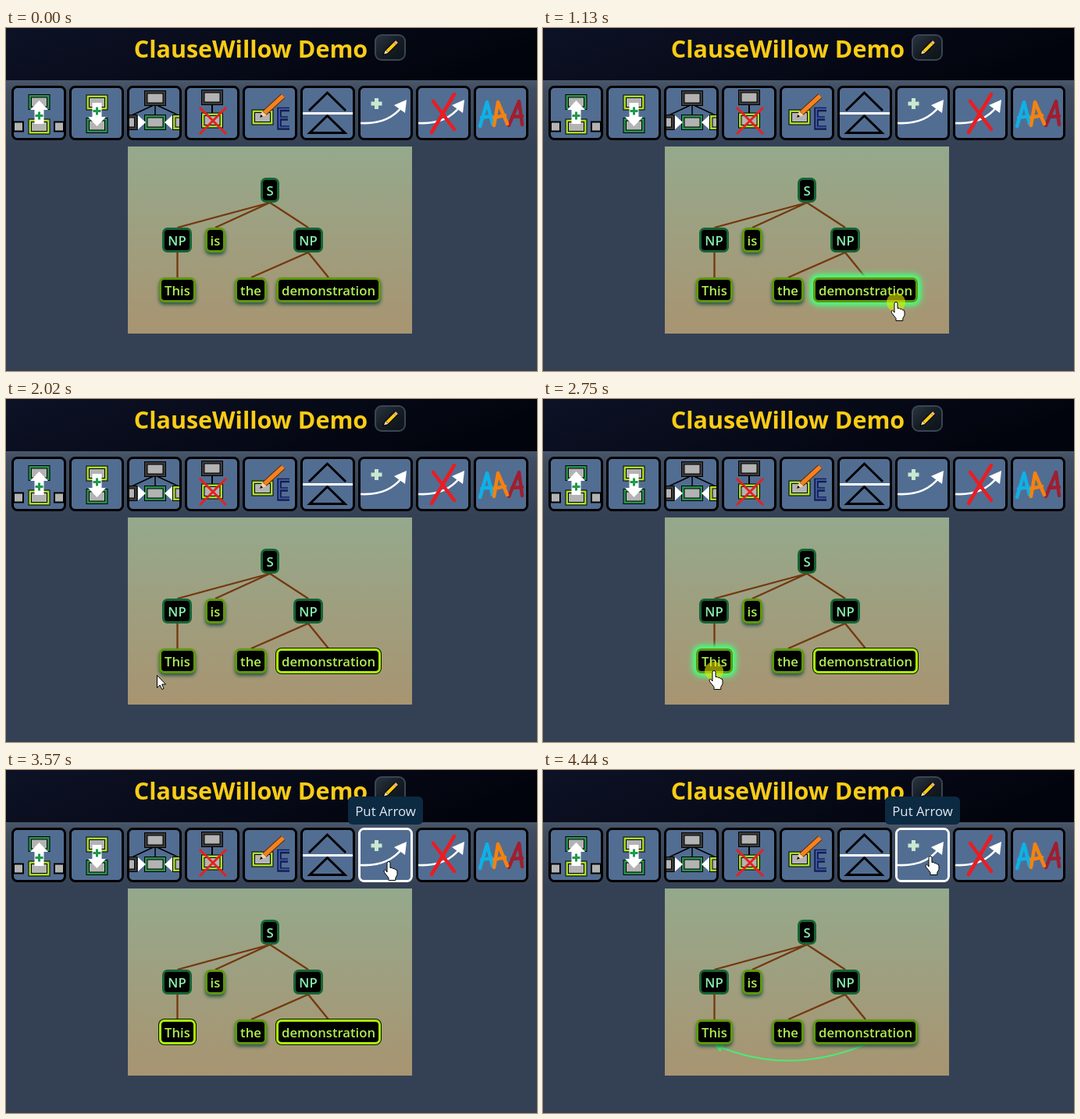
Recreate the animation shown at these times as an HTML page. Size 680x440 px, loop 6.57 s.

```html
<!DOCTYPE html>
<html lang="en">
<head>
<meta charset="utf-8">
<title>Syntax tree demo</title>
<style>
html, body { margin: 0; width: 100%; height: 100%; overflow: hidden; background: #334155; }
body { position: relative; font-family: "Open Sans", "Noto Sans", sans-serif; }
svg, #tree { position: absolute; left: 0; top: 0; width: 680px; height: 440px; }
text { font-family: "Open Sans", "Noto Sans", sans-serif; }
.node {
  position: absolute; box-sizing: border-box; height: 32px; padding-top: 2px;
  display: flex; align-items: center; justify-content: center;
  border: 3px solid #166534; border-radius: 7px;
  background: #000; color: #86efac;
  font-size: 16.7px; font-weight: 600; line-height: 1; white-space: nowrap;
}
.leaf { border-color: #5f980d; color: #b0ee50; box-shadow: 0 3px 4px rgba(25, 75, 65, .85); }
.picked { border-color: #aaf20a; box-shadow: 0 0 0 1px #0a1400; }
.glow { box-shadow: 0 0 4px 3px #50f47c, 0 0 9px 4px #50f47c; }
</style>
</head>
<body>
<svg viewBox="0 0 680 440">
  <defs>
    <linearGradient id="head" x2="1" y2=".25">
      <stop stop-color="#0d1226"/><stop offset="1" stop-color="#02040d"/>
    </linearGradient>
    <linearGradient id="bar" x2="0" y2="1">
      <stop stop-color="#4a586b"/><stop offset=".15" stop-color="#404d61"/><stop offset="1" stop-color="#354256"/>
    </linearGradient>
    <linearGradient id="board" x2="0" y2="1">
      <stop stop-color="#95a98c"/><stop offset="1" stop-color="#a89471"/>
    </linearGradient>
    <linearGradient id="edit" x2="1" y2="1">
      <stop stop-color="#2c3541"/><stop offset=".5" stop-color="#161d24"/><stop offset="1" stop-color="#0c1316"/>
    </linearGradient>
    <clipPath id="clip3"><rect x="158" y="77" width="64" height="64"/></clipPath>
    <rect id="btn" x="8.5" y="75.5" width="67" height="67" rx="6" fill="#526d92" stroke="#000" stroke-width="3"/>
    <g id="box">
      <path d="M-14-10h28v20h-28z"/>
      <path d="M-13-9h26v18h-26z" fill="currentColor"/>
      <path d="M-10.500-6.500h21v13h-21z"/>
      <path d="M-9.500-5.500h19v11h-19z" fill="#b3b3b3"/>
    </g>
    <path id="up" d="M0-15L11.500-3H6V15H-6V-3H-11.500Z" fill="#fff"/>
    <path id="plus" d="M-5 0H5M0-5V5" fill="none" stroke="#1d9a4a" stroke-width="3"/>
    <g id="swoop">
      <path d="M454 122Q489 124 507 101" fill="none" stroke="#fff" stroke-width="2.600"/>
      <path d="M513 92L511 109 497 99Z" fill="#fff"/>
    </g>
  </defs>

  <rect width="680" height="68" fill="url(#head)"/>
  <rect y="67" width="680" height="80" fill="url(#bar)"/>
  <rect y="147" width="680" height="293" fill="#344155"/>
  <text x="313.5" y="38" text-anchor="middle" font-size="30.5" font-weight="700" fill="#facc15">ClauseWillow Demo</text>

  <rect x="473" y="9" width="38" height="32" rx="8" fill="url(#edit)" stroke="#394554" stroke-width="2"/>
  <path d="M482.500 35L485 28.500 498 15.500 502.500 20 489.500 33Z"/>
  <path d="M488 30L498 20" stroke="#facc15" stroke-width="4"/>
  <path d="M498 20L500.500 17.500" stroke="#f4b183" stroke-width="4"/>
  <path d="M484 33.500L486 28.500 489.500 32Z" fill="#f5deb3"/>

  <use href="#btn"/><use href="#btn" x="74"/><use href="#btn" x="148"/>
  <use href="#btn" x="222"/><use href="#btn" x="296"/><use href="#btn" x="370"/>
  <use href="#btn" x="444"/><use href="#btn" x="518"/><use href="#btn" x="592"/>

  <!-- add parent -->
  <use href="#box" x="42.500" y="95" color="#2b9150"/>
  <use href="#box" x="42.500" y="126.500" color="#a8dc2c"/>
  <use href="#up" x="42.500" y="108"/>
  <use href="#plus" x="42.500" y="112.500"/>
  <path d="M10 120.500h12v12h-12zM62 120.500h12v12h-12z" fill="#b3b3b3" stroke="#000" stroke-width="2"/>

  <!-- add child -->
  <use href="#box" x="116.500" y="95.500" color="#a8dc2c"/>
  <use href="#box" x="116.500" y="125" color="#2b9150"/>
  <use href="#up" transform="translate(116.500 111) rotate(180)"/>
  <use href="#plus" x="116.500" y="106.500"/>

  <!-- add between -->
  <g clip-path="url(#clip3)">
    <path d="M191 98L161 112M191 98V112M191 98L221 112" stroke="#000" stroke-width="1.500"/>
    <use href="#box" x="191" y="90" color="#3b3b3b"/>
    <use href="#box" x="154.500" y="121" color="#3b3b3b"/>
    <use href="#box" x="191" y="121" color="#2b9150"/>
    <use href="#box" x="227" y="121" color="#a8dc2c"/>
    <path d="M169 112L179 121 169 130ZM213 112L203 121 213 130Z" fill="#fff"/>
  </g>

  <!-- delete node -->
  <path d="M264 97V110" stroke="#000" stroke-width="2"/>
  <use href="#box" x="264" y="89" color="#3b3b3b"/>
  <use href="#box" x="264" y="118.500" color="#a8dc2c"/>
  <path d="M248 102L282 136M282 102L248 136" stroke="#e8201c" stroke-width="3"/>

  <!-- rename -->
  <use href="#box" x="328.500" y="114.500" color="#a8dc2c"/>
  <path d="M363 104.500H350V128H363M350 116H361" fill="none" stroke="#141d4a" stroke-width="5.500"/>
  <path d="M363 104H350V127.500H363M350 115.500H361" fill="none" stroke="#3c55a8" stroke-width="2"/>
  <path d="M331 109L355 87" stroke="#5a2a0c" stroke-width="7.500"/>
  <path d="M331 109L355 87" stroke="#f58220" stroke-width="5.500"/>
  <path d="M325 115L328 106.500 333.500 112Z" fill="#f3d3a6"/>
  <path d="M325 115L326.500 111 329 113.500Z"/>

  <!-- collapse -->
  <g fill="none" stroke="#000" stroke-width="3">
    <path d="M388 106L411.500 83 435 106"/>
    <path d="M389 134.500L411.500 112.500 434 134.500Z"/>
    <path d="M380 109.500H444" stroke="#fff"/>
  </g>

  <!-- arrows -->
  <use href="#swoop"/>
  <path d="M467.500 97h14M474.500 90v14" stroke="#c9e8cf" stroke-width="5"/>
  <use href="#swoop" x="74"/>
  <path d="M574 85L545 134M547 94L574 130" stroke="#ea1d22" stroke-width="4.500" stroke-linecap="round"/>

  <!-- text colours -->
  <g fill="none" stroke-width="4.500" stroke-linecap="round" stroke-linejoin="round">
    <path d="M607 126L616 95 623 123M609 115L622 113" stroke="#0fb0e6"/>
    <path d="M644 125L657 94 661 124M648 114L661 113" stroke="#a01e2e"/>
    <path d="M625 125L630 95 642 123M625 115L639 112" stroke="#f5820f"/>
  </g>

  <rect x="156" y="152" width="364" height="240" fill="url(#board)"/>
  <path d="M219.500 256L338 224 268 256M338 224L387 256M219.500 288V320M314 320L387 288 413 320"
        fill="none" stroke="#74380f" stroke-width="2.300"/>
  <g id="link" fill="#4ee873">
    <path d="M413 352Q316 392 226 355" fill="none" stroke="#4ee873" stroke-width="2"/>
    <path d="M218 351.500L232 352 227 361.500Z"/>
  </g>
</svg>

<div id="tree"></div>

<svg viewBox="0 0 680 440">
  <g id="hover">
    <rect x="452.500" y="75.500" width="67" height="67" rx="6" fill="none" stroke="#fff" stroke-width="3"/>
    <rect x="438" y="34" width="96" height="36" rx="6" fill="#0c2a42"/>
    <text x="486" y="59" text-anchor="middle" font-size="16.800" fill="#e2e8f0">Put Arrow</text>
  </g>
  <g id="cursor" stroke="#000" stroke-linejoin="round">
    <circle id="press" r="12" fill="#e6e600" fill-opacity=".6" stroke="none"/>
    <path id="arrow" fill="#fff" d="M.5.5V16.500L4.200 13 6.700 18.500 9 17.500 6.700 12H11.500Z"/>
    <path id="hand" fill="#fff" d="M-2 13V1.500Q-2-.5 0-.5T2 1.500V7.500Q4.500 6.500 5.200 8.500 7.500 7.500 8.200 9.700 11 9.200 11 12V16.500L8.800 20.500V23.500H0V20.500L-5.500 13.500Q-7 10.500-4.500 10.200-3.500 10.300-2 13Z"/>
  </g>
</svg>

<script>
const LOOP = 6570;
const byId = id => document.getElementById(id);
const show = (id, on) => { byId(id).style.display = on ? "" : "none"; };

// label, left, top, width, leaf
const [root, , , , first, , last] = [
  ["S", 326, 192, 24], ["NP", 200, 256, 38], ["is", 255, 256, 26, true],
  ["NP", 368, 256, 38], ["This", 196, 320, 47, true],
  ["the", 293, 320, 41, true], ["demonstration", 346, 320, 134, true]
].map(([label, x, y, w, leaf]) => {
  const el = document.createElement("div");
  el.className = leaf ? "node leaf" : "node";
  el.textContent = label;
  el.style.cssText = `left:${x}px;top:${y}px;width:${w}px`;
  byId("tree").append(el);
  return el;
});

// pointer stops: time, x, y
const stops = [
  [450, 580, 411], [520, 545, 395], [590, 507, 372], [660, 471, 349],
  [730, 458, 348], [800, 453, 350], [930, 452, 352],
  [1590, 428, 356], [1670, 380, 374], [1740, 318, 382], [1810, 256, 376],
  [1880, 215, 366], [1950, 198, 358], [2020, 193, 354],
  [2350, 205, 350], [2420, 219, 349],
  [3220, 228, 335], [3290, 280, 280], [3360, 352, 209], [3430, 420, 160],
  [3500, 465, 130], [3570, 490, 118], [3640, 499, 114], [3710, 502, 114],
  [4040, 500, 114], [4110, 496, 111]
];

function draw(t) {
  const during = (from, to = LOOP) => t >= from && t < to;
  const stop = stops.filter(s => s[0] <= t).pop();
  show("cursor", stop);
  if (stop) byId("cursor").setAttribute("transform", `translate(${stop[1]} ${stop[2]})`);

  const hand = during(660, 1590) || during(2350, 3290) || during(3500);
  show("hand", hand);
  show("arrow", !hand);
  show("press", during(1130, 1590) || during(2750, 2820) || during(4310, 4440));
  show("hover", during(3500));
  show("link", during(4440));

  last.classList.toggle("glow", during(660, 1260));
  last.classList.toggle("picked", during(1260, 4440));
  first.classList.toggle("glow", during(2350, 2820));
  first.classList.toggle("picked", during(2820, 4440));
  root.classList.toggle("glow", during(3360, 3430));
}

let start;
function tick(now) {
  start ??= now;
  draw((now - start) % LOOP);
  requestAnimationFrame(tick);
}
draw(0);
requestAnimationFrame(tick);
</script>
</body>
</html>
```
